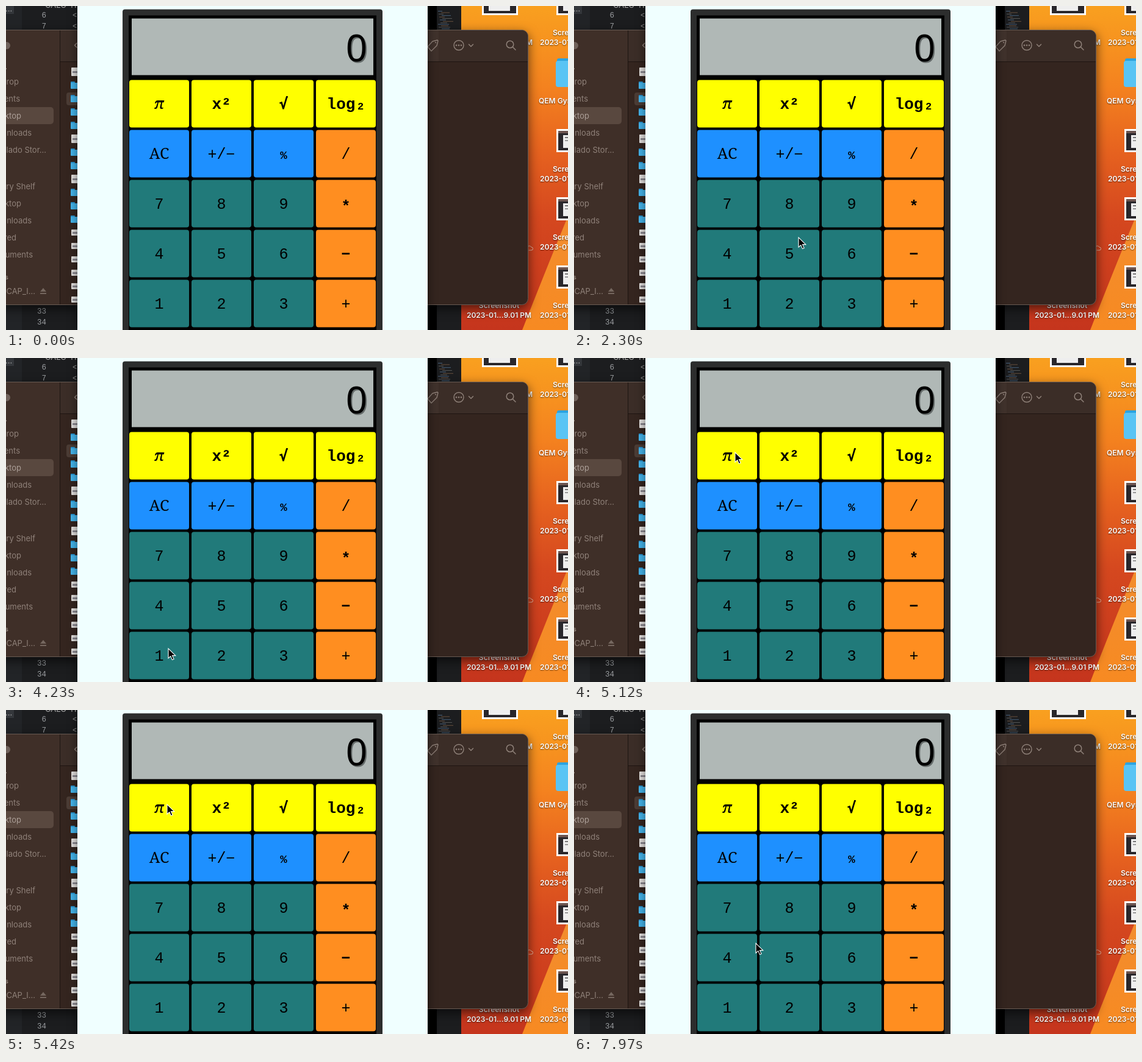
These frames come from a looping animation (921x532 px, 8000 ms). An HTML page:

```html
<!DOCTYPE html>
<html lang="en">
<head>
<meta charset="utf-8">
<title>Calculator</title>
<style>
html, body { margin: 0; width: 100%; height: 100%; overflow: hidden; background: #000; }
svg { display: block; width: 921px; height: 532px; }
text { white-space: pre; }
.ui { font-family: Inter, sans-serif; }
.mono { font-family: "Liberation Mono", monospace; }
.dejavu { font-family: "DejaVu Sans Mono", monospace; }
.slab { font-family: "Noto Serif", serif; }
.sans { font-family: "Noto Sans", sans-serif; font-weight: 500; }
.label { font-weight: 600; text-shadow: 0 1px 2px #0009; }
.b { font-weight: 700; }
.i { font-style: italic; }
.window { filter: drop-shadow(0 6px 9px #0009); }
.page { filter: drop-shadow(0 0 8px #0008); }
</style>
</head>
<body>
<svg id="stage" viewBox="0 0 921 532">
  <defs>
    <linearGradient id="sky" x2="0" y2="1">
      <stop offset="0" stop-color="#f9a01f"/>
      <stop offset=".25" stop-color="#f4821f"/>
      <stop offset=".45" stop-color="#e6621f"/>
      <stop offset=".65" stop-color="#d5481f"/>
      <stop offset="1" stop-color="#c5351d"/>
    </linearGradient>
    <linearGradient id="dune" x2="0" y2="1">
      <stop offset="0" stop-color="#f28d2e"/>
      <stop offset="1" stop-color="#f78a22"/>
    </linearGradient>
  </defs>
  <g id="scene"></g>
  <path id="cursor" d="M0 0V16l3.8-3.4 2.6 6 2.7-1.2-2.6-5.8h5.3z" fill="#000" stroke="#fff" stroke-width="1.1"/>
</svg>
<script>
const rect = (x, y, w, h, fill, rx = 0, extra = '') =>
  `<rect x="${x}" y="${y}" width="${w}" height="${h}" fill="${fill}" rx="${rx}" ${extra}/>`;
const text = (x, y, s, size, fill, cls = 'ui', anchor = 'start') =>
  `<text x="${x}" y="${y}" font-size="${size}" fill="${fill}" class="${cls}" text-anchor="${anchor}">${s}</text>`;
const line = (d, color, width = 1.5) =>
  `<path d="${d}" fill="none" stroke="${color}" stroke-width="${width}" stroke-linecap="round" stroke-linejoin="round"/>`;

function editor() {
  let s = rect(0, 0, 746, 532, '#1c1d1f') + rect(691, 0, 15, 532, '#000') +
    rect(0, 0, 26, 532, '#222427') + rect(0, 0, 13, 13, '#34373b');
  s += text(-1, 9, '...', 13, '#aaa') + text(64, 3, 'CALC-TH', 13, '#aaa');
  [['6', 19], ['7', 37], ['33', 505], ['34', 523]].forEach(([n, y]) =>
    s += text(66, y, n, 12.5, '#9a9da0', 'mono', 'end'));
  s += text(109, 19, '&lt;', 12, '#999', 'mono') + text(109, 37, '&lt;', 12, '#999', 'mono');
  for (let i = 0; i < 13; i++) {
    const indent = (i * 5) % 9;
    s += rect(708 + indent, 8 + i * 2.4, 7 + (i * 7) % 13, 1, ['#48607a', '#68503e', '#555'][i % 3]);
  }
  return s;
}

function thumb(x, y, w, h) {
  return rect(x, y, w, h, '#fff') + rect(x + 3, y + 3, w - 6, h - 6, '#29272b') +
    rect(x + 3, y + 3, w - 6, 4, '#6c5550') + rect(x + 11, y + 10, w - 24, h - 17, '#eee') +
    rect(x + 14, y + 13, w - 34, 2, '#777') + rect(x + 14, y + 18, w - 38, 2, '#999');
}

function desktop() {
  let s = rect(746, 0, 175, 532, 'url(#sky)') +
    '<path d="M921 345Q888 425 846 532H921z" fill="url(#dune)"/>';
  s += thumb(780, -23, 59, 38);
  [-23, 202, 314, 426].forEach(y => s += thumb(902, y, 59, 38));
  s += rect(903, 86, 24, 12, '#2ba3df', 3) + rect(901, 90, 50, 43, '#59c4f4', 4);
  const label = (x, y, t, a) => text(x, y, t, 12, '#fff', 'ui label', a);
  [48, 272, 384, 496].forEach(y =>
    s += label(896, y, 'Screenshot') + label(875, y + 16, '2023-01...9.01 PM'));
  s += label(863, 64, 'M', 'end') + label(873, 160, 'QEM Gymn');
  s += label(808, 496, 'Screenshot', 'middle') + label(808, 512, '2023-01...9.01 PM', 'middle');
  return s + line('M857 401h4a2.5 2.5 0 0 0 0-5a4 4 0 0 0-7 0', '#e8b9a5', 1);
}

function folderIcon(y) {
  return rect(106, y - 6, 7, 5, '#2893cf', 1) + rect(106, y - 4, 16, 10, '#45b5ec', 1);
}

function pageIcon(y, h) {
  return rect(107, y - h / 2, 14, h, '#e4e1df', 1) + rect(109, y - 1, 10, 3, '#8c8a91');
}

function finder() {
  const ink = '#8f8179';
  let s = rect(-20, 39.5, 875.5, 451, '#34251f', 10, 'stroke="#695b53" class="window"') +
    rect(0, 40, 88, 450, '#3f2f28') + rect(88, 40, 1, 450, '#1d1511') +
    '<path d="M89 40H845a10 10 0 0 1 10 10V91H89z" fill="#3b2d27"/>' + rect(89, 91, 766, 1, '#1e1511') +
    rect(691, 40, 18, 51, '#40322c') + rect(99, 142, 30, 21, '#4b3c35', 4);
  s += `<circle cx="1" cy="65" r="6" fill="#6f615a"/>` + rect(-10, 166, 88, 28, '#59483f', 5);
  [['rop', 21, 129], ['ents', 23, 157], ['ktop', 25, 185], ['nloads', 42, 213],
   ['elado Stor...', 66, 241], ['ry Shelf', 48, 301], ['ktop', 25, 329], ['nloads', 42, 357],
   ['red', 17, 385], ['uments', 44, 413], ['ECAP_I...', 48, 473]].forEach(([t, x, y]) =>
    s += text(x, y, t, 13, y === 185 ? '#ab9e97' : ink, 'ui', 'end'));
  s += text(4, 449, 's', 11, ink, 'ui b', 'end') + rect(0, 102, 1, 2, ink);
  s += '<path d="M56 469l5-6 5 6zM56 471h10v2H56z" fill="#75675f"/>';
  for (let i = 0; i < 18; i++) {
    const y = 108 + i * 22;
    s += i > 11 ? pageIcon(y, 10) : [0, 5, 8].includes(i) ? pageIcon(y, 14) : folderIcon(y);
  }
  s += line('M116 61l-3.5 3.5 3.5 3.5', ink);
  s += line('M691 67l8-9 8-2 1 1-2 8-9 9z', ink, 1.3) + `<circle cx="704" cy="60" r="1" fill="${ink}"/>`;
  s += `<circle cx="742" cy="64.5" r="8" fill="none" stroke="${ink}" stroke-width="1.4"/>`;
  [738, 742, 746].forEach(x => s += `<circle cx="${x}" cy="64.5" r="1.3" fill="${ink}"/>`);
  s += line('M758.5 63l3.5 3.5 3.5-3.5', ink);
  s += `<circle cx="826" cy="63" r="5.8" fill="none" stroke="${ink}" stroke-width="1.5"/>`;
  return s + line('M830.5 67.5l4.5 4.5', ink);
}

// Font class and size for keys that differ from the plain digits.
const keyStyle = {
  'π': ['slab b i', 25], 'x²': ['mono b', 26], '√': ['dejavu b', 25], 'log': ['mono b', 26],
  'AC': ['slab', 25], '%': ['mono b', 19], '*': ['mono b', 25], '−': ['mono b', 25]
};

function calculator() {
  let s = rect(117, 0, 574, 532, '#f0ffff', 0, 'class="page"') + rect(191, 5.5, 426, 540, '#2c2d2d', 4) +
    rect(201, 15.5, 406, 530, '#000') + rect(206, 20.5, 396, 93, '#b0b8b6');
  s += text(576.5, 93, '0', 62, '#646a69', 'sans', 'middle') + text(574.5, 91, '0', 62, '#000', 'sans', 'middle');
  const rows = [['π', 'x²', '√', 'log'], ['AC', '+/−', '%', '/'], [7, 8, 9, '*'], [4, 5, 6, '−'], [1, 2, 3, '+']];
  rows.forEach((row, j) => row.forEach((key, i) => {
    const x = 202 + i * 102, y = 121.5 + j * 82, cx = x + 49;
    const fill = j === 0 ? '#ffff00' : i === 3 ? '#ff8e20' : j === 1 ? '#1e90ff' : '#217a7a';
    const [cls, size] = keyStyle[key] || ['mono', 25];
    const dx = key === 'log' ? -8 : 0, dy = key === '*' ? 51 : 47.5;
    s += `<g ${j + i ? '' : 'id="pi"'}>` + rect(x, y, 98, 78, fill, 4) +
      text(cx + dx, y + dy, key, size, '#000', cls, 'middle') +
      (key === 'log' ? text(cx + 24, y + 48.5, '2', 17, '#000', 'mono b', 'middle') : '') + '</g>';
  }));
  return s;
}

const byId = id => document.getElementById(id);
byId('scene').innerHTML = editor() + desktop() + finder() + calculator();

// Pointer samples: time, x, y; each holds until the next.
const track = [
  [1280, 880, 70], [1420, 730, 90], [1560, 570, 140], [1710, 450, 205], [1850, 394, 269],
  [2150, 380, 330], [2300, 368, 380], [2440, 361, 391], [2590, 356, 395], [2740, 354, 397],
  [3340, 334, 415], [3490, 300, 447], [3630, 276, 469], [3780, 266, 477],
  [4520, 270, 430], [4670, 276, 335], [4820, 272, 235], [4970, 266, 175], [5120, 264, 155],
  [6770, 264, 164], [7070, 345, 300], [7220, 436, 423],
  [7520, 503, 503], [7670, 430, 465], [7820, 345, 410], [7970, 298, 383]
];
const start = performance.now();

function draw(now) {
  const t = Math.max(0, now - start) % 8000;
  const spot = track.filter(p => p[0] <= t).pop();
  byId('cursor').setAttribute('transform', spot ? `translate(${spot[1]} ${spot[2]})` : 'translate(-50 -50)');
  byId('pi').setAttribute('transform', `translate(0 ${t >= 5270 && t < 5420 ? -4 : 0})`);
  requestAnimationFrame(draw);
}
draw(start);
</script>
</body>
</html>
```
